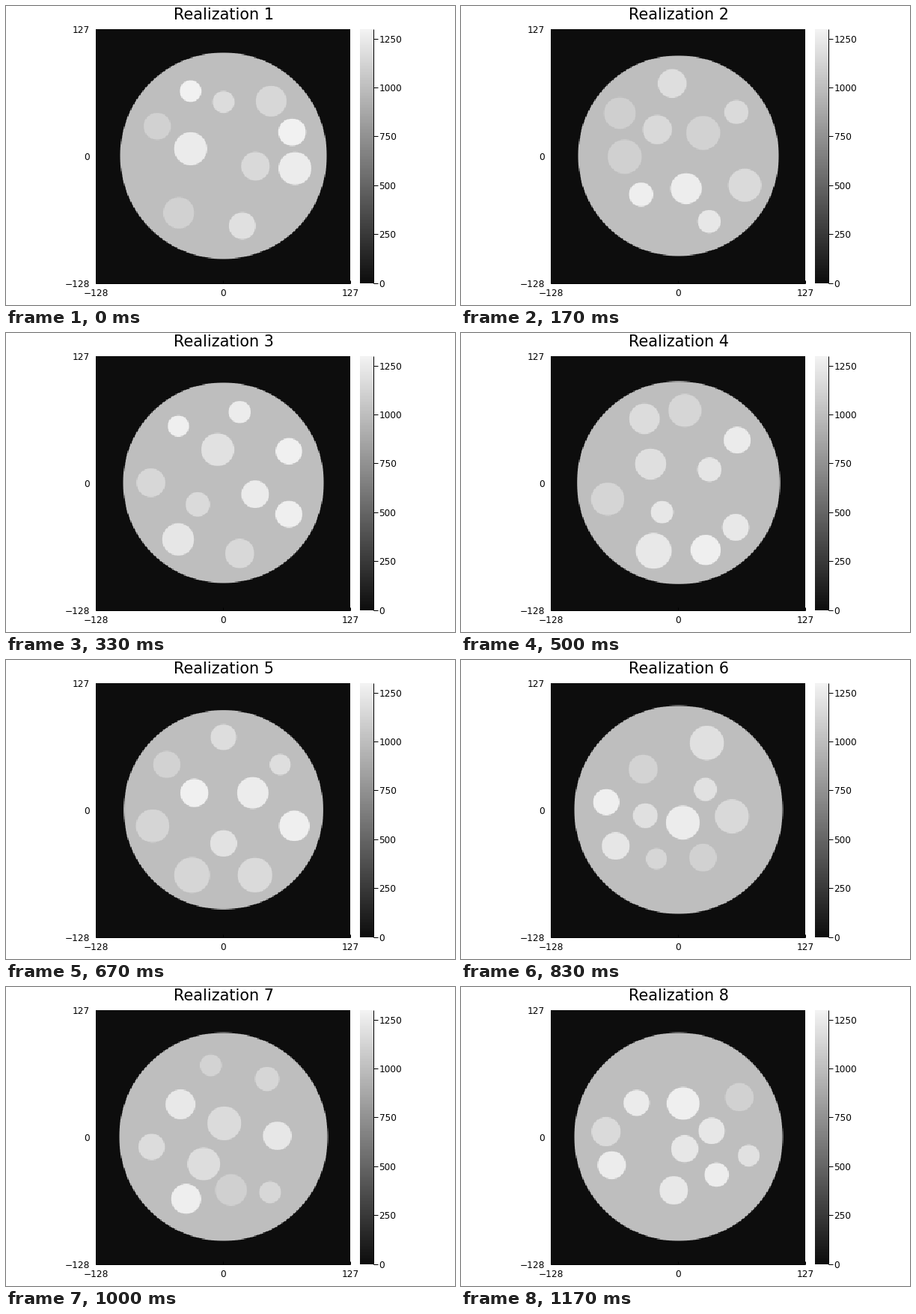
Recreate the animation shown at these times as a matplotlib script. Size 600 px wide and 400 px high, loop 1.34 s.

```python
import numpy as np
import matplotlib.pyplot as plt
from matplotlib.animation import FuncAnimation

plt.rcParams["font.family"] = "DejaVu Sans"

STEP = 10                                        # ms per animation frame
STARTS = [0, 170, 330, 500, 670, 830, 1000, 1170]
LOOP = 1340

LEFT, RIGHT, TOP, BOTTOM = 120, 460, 31, 371     # heatmap in pixels
CELLS = 256
CELL = (RIGHT - LEFT) / CELLS
DARK, BODY, LIGHT = 13, 190, 242

rng = np.random.default_rng(5)
X, Y = np.meshgrid(np.arange(CELLS) - 128, np.arange(CELLS) - 127)


def paint(grid, x, y, radius, grey):
    """Lay a disc with a one-cell soft rim over the grid, all in cells."""
    cover = np.clip(radius + 0.5 - np.hypot(X - x, Y - y), 0, 1)
    grid += (grey - grid) * cover


def ring(start, count):
    return [start + 360 * k / count for k in range(count)]


def phantom(size, core=(), near=(), mid=(), far=()):
    """Body with inserts on four rings, each placed by its angle in degrees."""
    grid = np.full((CELLS, CELLS), float(DARK))
    paint(grid, 0, 0, size, BODY)
    spots = [np.exp(1j * np.radians(angle)) * reach / CELL
             for reach, angles in ((18, core), (45, near), (72, mid), (97, far))
             for angle in angles]
    for spot in spots:
        gap = min(abs(spot - other) for other in spots if other != spot)
        radius = min(rng.uniform(14, 24) / CELL, 0.45 * gap)
        paint(grid, spot.real, spot.imag, radius, rng.uniform(207, 241))
    return grid


scenes = [
    phantom(104, near=[-168, 18], mid=[-90],
            far=[-156, -117, -49, -19, 10, 75, 128]),
    phantom(101, near=[-129, -43, 77], mid=[134, 179],
            far=[-144, -95, -37, 24, 65]),
    phantom(101, near=ring(20, 3), far=ring(-180, 7)),
    phantom(102.3, near=[-146, -23, 119],
            far=[-118, -85, -36, 38, 68, 110, 167]),
    phantom(100.4, near=ring(-30, 3), far=ring(-90, 7)),
    phantom(105, core=[71], near=[-37, 170], mid=[-131, 7, 63, 114],
            far=[-174, -67, 150]),
    phantom(105, core=[-87], near=[126], mid=[-143, -1, 82],
            far=[-100, -53, 50, 121, 172]),
    phantom(105, core=[63], near=[-82, -10], mid=[-141, 45, 95],
            far=[-176, -33, 15, 157]),
]

fig = plt.figure(figsize=(6, 4), dpi=100, facecolor="white")
ax = fig.add_axes([0, 0, 1, 1])
ax.axis("off")


def gray_image(data, extent):
    return ax.imshow(data, extent=extent, cmap="gray", vmin=0, vmax=255,
                     interpolation="nearest", aspect="auto")


def label(x, y, text, size=12.1, ha="center"):
    return ax.text(x, y, text, fontsize=size * 0.72, ha=ha, va="baseline",
                   color="black")


def line(x, y):
    ax.plot(x, y, color="black", lw=0.72, solid_capstyle="butt")


heatmap = gray_image(scenes[0], (LEFT, RIGHT, BOTTOM, TOP))
gray_image(np.linspace(LIGHT, DARK, 256)[:, None], (472.5, 490.5, BOTTOM, TOP))

line([LEFT - 0.5, LEFT - 0.5], [TOP, BOTTOM])
line([LEFT, RIGHT], [BOTTOM, BOTTOM])
for x, text in ((LEFT, "−128"), (290, "0"), (RIGHT, "127")):
    line([x, x], [BOTTOM - 4, BOTTOM])
    label(x, 388, text)
for y, text in ((36, "127"), (206, "0"), (376, "−128")):
    label(112, y, text, ha="right")

line([490.5, 490.5], [TOP, BOTTOM])
for value in range(0, 1300, 250):
    y = BOTTOM - 0.5 - value * (BOTTOM - TOP) / 1300
    line([491, 497], [y, y])
    label(498.5, y + 5, str(value), ha="left")

title = label(290.5, 18, "", size=20.8)
ax.set_xlim(0, 600)
ax.set_ylim(400, 0)


def update(i):
    k = int(np.searchsorted(STARTS, i * STEP, side="right")) - 1
    heatmap.set_data(scenes[k])
    title.set_text(f"Realization {k + 1}")
    return heatmap, title


anim = FuncAnimation(fig, update, frames=LOOP // STEP, interval=STEP,
                     repeat=True, repeat_delay=0)
plt.show()
```
